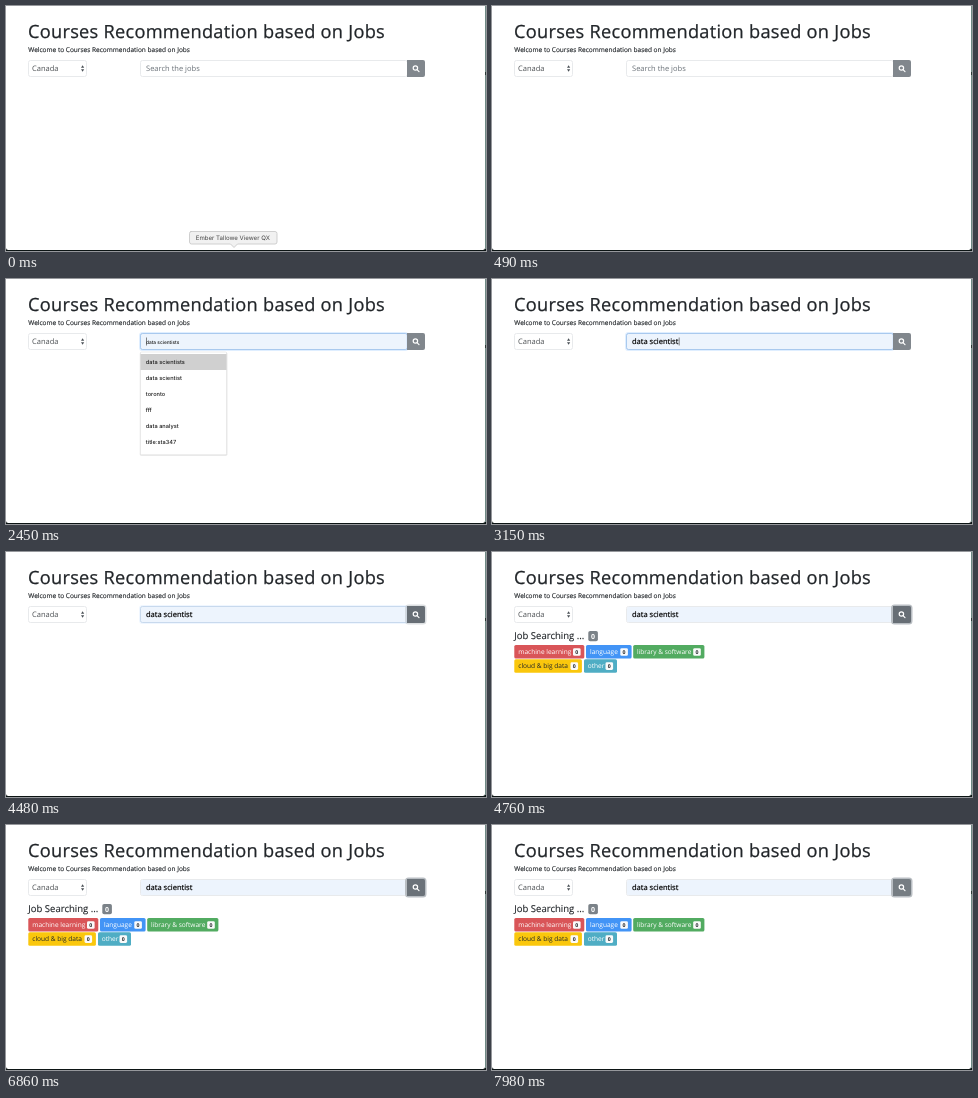
An HTML page that plays this animation: 480 px wide and 245 px high, repeating every 8 s.

```html
<!DOCTYPE html>
<html lang="en">
<head>
<meta charset="utf-8">
<title>Courses Recommendation based on Jobs</title>
<style>
html, body { margin: 0; width: 100%; height: 100%; overflow: hidden; background: #fff; }
svg { display: block; width: 480px; height: 245px; }
text { font-family: "Open Sans", "Noto Sans", sans-serif; fill: #212529; text-rendering: geometricPrecision; white-space: pre; }
.title { font-size: 18.2px; letter-spacing: .27px; stroke: #212529; stroke-width: .25; }
.lead { font-size: 6.51px; stroke: #212529; stroke-width: .14; }
.field { font-size: 7.54px; }
.muted { fill: #6a7178; }
.native text { font-family: Inter, "Liberation Sans", sans-serif; font-size: 5.65px; font-weight: 500; fill: #1c1c1c; }
.native .small { font-size: 4.8px; }
.heading { font-size: 9.5px; stroke: #212529; stroke-width: .14; }
.tag { font-size: 6.57px; fill: #fff; }
.dark { fill: #212529; }
.bold { fill: #000; stroke: #000; stroke-width: .2; }
.num { font-size: 5.2px; font-weight: 700; text-anchor: middle; }
.box { fill: #fff; stroke: #e8eaec; }
.caret { fill: #333; }

/* Every timed part shares one 8 s clock; 1% = 80 ms */
.timed { opacity: 0; animation: 8s step-end infinite; }
.tip { animation-name: tip; }
.placeholder { animation-name: placeholder; }
.glow { animation-name: glow; }
.menu { animation-name: menu; }
.first { animation-name: first; }
.second { animation-name: second; }
.filled { animation-name: filled; }
.typed { animation-name: typed; }
.caret-a { animation-name: caret-a; }
.caret-b { animation-name: caret-b; }
.hover { animation-name: hover; }
.ring { animation-name: ring; }
.results { animation-name: results; }

@keyframes tip { 0% { opacity: 1 } 3.5% { opacity: .75 } 4.375% { opacity: .5 } 5.25% { opacity: .25 } 6.125%, 100% { opacity: 0 } }
@keyframes placeholder { 0% { opacity: 1 } 30.625%, 100% { opacity: 0 } }
@keyframes glow {
  0% { opacity: 0 } 26.25% { opacity: .6 } 27.125% { opacity: 1 }
  56% { opacity: .5 } 56.875%, 100% { opacity: 0 }
}
@keyframes menu { 0% { opacity: 0 } 27.125% { opacity: 1 } 39.375%, 100% { opacity: 0 } }
@keyframes first { 0% { opacity: 0 } 30.625% { opacity: 1 } 31.5%, 100% { opacity: 0 } }
@keyframes second { 0% { opacity: 0 } 31.5% { opacity: 1 } 39.375%, 100% { opacity: 0 } }
@keyframes filled { 0% { opacity: 0 } 30.625%, 100% { opacity: 1 } }
@keyframes typed { 0% { opacity: 0 } 39.375%, 100% { opacity: 1 } }
@keyframes caret-a { 0% { opacity: 0 } 25.375% { opacity: 1 } 37.625%, 100% { opacity: 0 } }
@keyframes caret-b { 0% { opacity: 0 } 39.375% { opacity: 1 } 45.5% { opacity: 0 } 51.625% { opacity: 1 } 56%, 100% { opacity: 0 } }
@keyframes hover {
  0% { opacity: 0 } 51.625% { opacity: .4 } 52.5% { opacity: 1 }
  85.75% { opacity: .85 } 86.625% { opacity: .7 } 87.5% { opacity: .55 } 88.375% { opacity: .45 } 89.25%, 100% { opacity: .4 }
}
@keyframes ring { 0% { opacity: 0 } 56% { opacity: .5 } 56.875%, 100% { opacity: 1 } }
@keyframes results { 0% { opacity: 0 } 56.875%, 100% { opacity: 1 } }
</style>
</head>
<body>
<svg viewBox="0 0 480 245">
  <!-- Window with rounded lower corners over a dark desktop -->
  <rect width="480" height="245" fill="#0c1414"/>
  <rect x="479" width="1" height="243" fill="#6f8a85"/>
  <rect x="479" y="66" width="1" height="3" fill="#2c3836"/>
  <path d="M0 0h479v241.500a2.500 2.500 0 0 1-2.500 2.500h-474a2.500 2.500 0 0 1-2.500-2.500z" fill="#fff"/>

  <text class="title" x="22" y="32">Courses Recommendation based on Jobs</text>
  <text class="lead" x="22.3" y="45.6">Welcome to Courses Recommendation based on Jobs</text>

  <!-- Country select -->
  <rect class="box" x="22.5" y="54.5" width="58" height="16" rx="2"/>
  <text class="field" x="26" y="65.2" fill-opacity=".8">Canada</text>
  <path d="M75 61.7h3.200l-1.600-2.400zM75 63.300h3.200l-1.600 2.400z" fill="#4a5056"/>

  <!-- Search field -->
  <rect class="box" x="134.5" y="54.5" width="267" height="16" rx="2"/>
  <rect class="timed filled" x="135" y="55" width="266" height="15" rx="1.5" fill="#edf4fd"/>
  <g class="timed glow" fill="none" stroke="#80bdff">
    <rect x="134" y="54" width="267.5" height="17" rx="2.5" stroke-width="2" stroke-opacity=".25"/>
    <rect x="134.5" y="54.5" width="267" height="16" rx="2" stroke="#a3c6ee" stroke-opacity=".85"/>
  </g>
  <text class="field muted timed placeholder" x="140" y="65.2">Search the jobs</text>
  <g class="native">
    <text class="small timed first" x="140" y="64.8">data scientists</text>
    <text class="small timed second" x="140" y="64.8">data scientist</text>
  </g>
  <text class="field bold timed typed" x="140" y="65.2">data scientist</text>
  <rect class="caret timed caret-a" x="140.3" y="58.500" width=".6" height="8"/>
  <rect class="caret timed caret-b" x="186.800" y="58.500" width=".6" height="8"/>

  <!-- Search button -->
  <rect class="timed ring" x="400" y="53.5" width="19.5" height="18" rx="2.5" fill="none" stroke="#b9bec3" stroke-width="2"/>
  <path d="M401 54h16a2 2 0 0 1 2 2v13a2 2 0 0 1-2 2h-16z" fill="#81878d"/>
  <path class="timed hover" d="M401 54h16a2 2 0 0 1 2 2v13a2 2 0 0 1-2 2h-16z" fill="#676e75"/>
  <g fill="none" stroke="#fff" stroke-width="1.2">
    <circle cx="409.4" cy="62" r="2.2"/>
    <path d="M411 63.6l2 2" stroke-linecap="round"/>
  </g>

  <!-- Suggestions -->
  <g class="native timed menu">
    <rect x="133.8" y="73.3" width="87.6" height="103.4" rx="1.5" fill="#000" fill-opacity=".1"/>
    <rect x="134.4" y="73" width="86.2" height="102.8" rx="1" fill="#fff" stroke="#dadada" stroke-width=".5"/>
    <rect class="timed first" x="134.5" y="75" width="86" height="16" fill="#d0d0d0"/>
    <rect class="timed second" x="134.5" y="91" width="86" height="16" fill="#d0d0d0"/>
    <text x="139.8" y="85.2">data scientists</text>
    <text x="139.8" y="101.2">data scientist</text>
    <text x="139.8" y="117.2">toronto</text>
    <text x="139.8" y="133.2">fff</text>
    <text x="139.8" y="149.2">data analyst</text>
    <text x="139.8" y="165.2">title:sta347</text>
  </g>

  <!-- Results -->
  <g class="timed results">
    <text class="heading" x="22.3" y="87.2">Job Searching ...</text>
    <rect x="96.3" y="79" width="9.6" height="10.2" rx="1.8" fill="#7b8288"/>
    <text class="num" x="101.1" y="86.7" style="font-size:7px;fill:#fff">0</text>

    <rect x="22.3" y="93" width="70" height="13.6" rx="1.6" fill="#d95558"/>
    <rect x="94" y="93" width="45.6" height="13.6" rx="1.6" fill="#4294f6"/>
    <rect x="141.2" y="93" width="71.2" height="13.6" rx="1.6" fill="#52ab61"/>
    <rect x="22.3" y="107.2" width="67.6" height="13.6" rx="1.6" fill="#fac70d"/>
    <rect x="92" y="107.2" width="33" height="13.6" rx="1.6" fill="#4fadc4"/>

    <text class="tag" x="26.3" y="102.2">machine learning</text>
    <text class="tag" x="98" y="102.2">language</text>
    <text class="tag" x="145" y="102.2">library &amp; software</text>
    <text class="tag dark" x="26.3" y="116.4">cloud &amp; big data</text>
    <text class="tag" x="95.8" y="116.4">other</text>

    <g fill="#fafafa">
      <rect x="81" y="96.2" width="7.6" height="7.6" rx="1.4"/>
      <rect x="128.3" y="96.2" width="7.6" height="7.6" rx="1.4"/>
      <rect x="201.2" y="96.2" width="7.6" height="7.6" rx="1.4"/>
      <rect x="78.5" y="110.3" width="7.6" height="7.6" rx="1.4"/>
      <rect x="113.5" y="110.3" width="7.6" height="7.6" rx="1.4"/>
    </g>
    <text class="num" x="84.8" y="101.9">0</text>
    <text class="num" x="132.1" y="101.9">0</text>
    <text class="num" x="205" y="101.9">0</text>
    <text class="num" x="82.3" y="116">0</text>
    <text class="num" x="117.3" y="116">0</text>
  </g>

  <!-- Dock label -->
  <g class="native timed tip">
    <path d="M184.5 225.5h84.5a2 2 0 0 1 2 2v8.5a2 2 0 0 1-2 2h-37.5l-3.5 3.5-3.5-3.5h-39a2 2 0 0 1-2-2v-8.5a2 2 0 0 1 2-2z" fill="#f1f1f1" stroke="#c4c4c4" stroke-width=".8"/>
    <text x="226.8" y="233.7" text-anchor="middle" style="font-size:6.1px;font-weight:400;fill:#444">Ember Tallowe Viewer QX</text>
  </g>
</svg>
</body>
</html>
```
